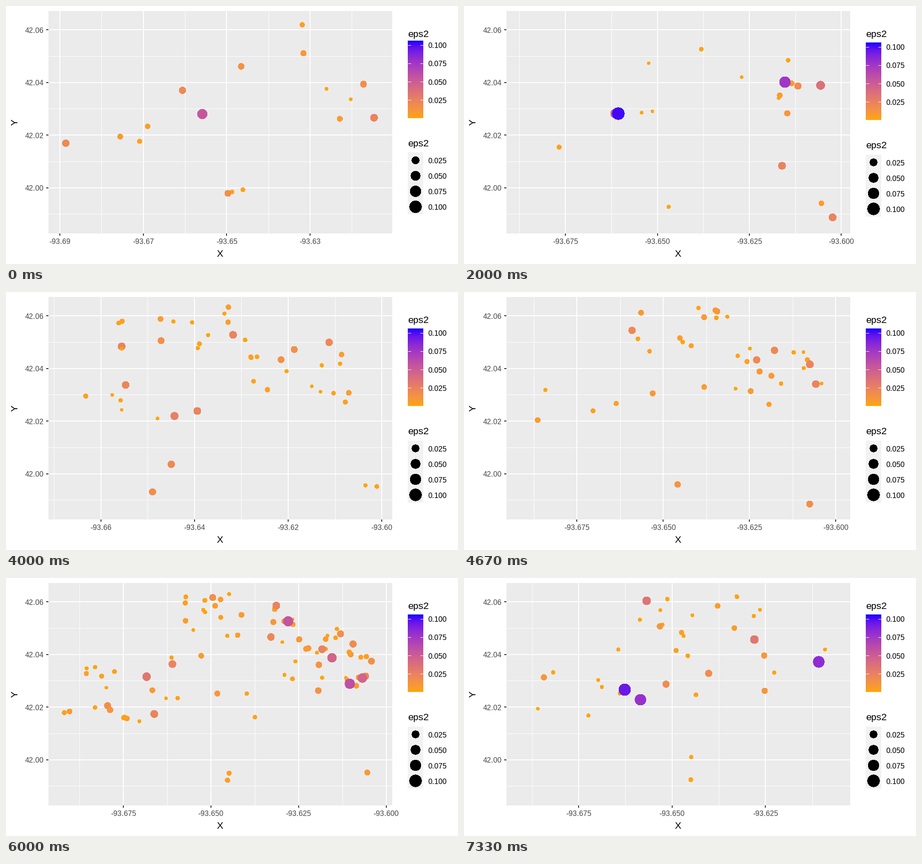
These frames come from a looping animation (990 by 566 pixels, 8 s). A matplotlib script:

```python
import numpy as np
import matplotlib.pyplot as plt
from matplotlib.animation import FuncAnimation
from matplotlib.patches import Rectangle

W, H, DPI = 990, 566, 64
PT = 72 / DPI
LOOP, STEP = 8000, 50
LEFT, RIGHT, TOP, BOTTOM = 92.5, 845.5, 10.5, 498.5
LAT_TOP, LAT_PX = 42.06, 115.4 / 0.02
R_MIN, R_SPAN = 3.1, 10.3
EPS_MIN, EPS_MAX = 0.0005, 0.1059
BREAKS = (0.025, 0.05, 0.075, 0.1)

# Neighbourhoods: longitude, latitude, half width, half height, share of dots
HOODS = np.array([
    (-93.643, 42.055, 0.017, 0.009, 0.29),
    (-93.617, 42.038, 0.013, 0.012, 0.34),
    (-93.680, 42.025, 0.014, 0.011, 0.21),
    (-93.651, 42.029, 0.014, 0.013, 0.10),
    (-93.647, 41.997, 0.003, 0.005, 0.02),
    (-93.604, 41.992, 0.004, 0.004, 0.04)])

plt.rcParams["font.family"] = "Liberation Sans"
plt.rcParams["text.hinting"] = "native"
plt.rcParams["text.hinting_factor"] = 1
fig = plt.figure(figsize=(W / DPI, H / DPI), dpi=DPI, facecolor="white")
ax = fig.add_axes([0, 0, 1, 1])
ax.set_xlim(0, W)
ax.set_ylim(H, 0)
ax.axis("off")

XYZ = np.array([[0.4124, 0.3576, 0.1805], [0.2126, 0.7152, 0.0722],
                [0.0193, 0.1192, 0.9505]])
WHITE = XYZ.sum(axis=1)


def to_lab(rgb):
    rgb = np.array(rgb, float)
    lin = np.where(rgb > 0.04045, ((rgb + 0.055) / 1.055) ** 2.4, rgb / 12.92)
    xyz = XYZ @ lin / WHITE
    f = np.where(xyz > 0.008856, np.cbrt(xyz), 7.787 * xyz + 16 / 116)
    return np.array([116 * f[1] - 16, 500 * (f[0] - f[1]), 200 * (f[1] - f[2])])


def from_lab(lab):
    fy = (lab[..., 0] + 16) / 116
    f = np.stack([fy + lab[..., 1] / 500, fy, fy - lab[..., 2] / 200], axis=-1)
    xyz = np.where(f > 0.2069, f ** 3, (f - 16 / 116) / 7.787)
    lin = np.clip((xyz * WHITE) @ np.linalg.inv(XYZ).T, 0, 1)
    rgb = np.where(lin > 0.0031308, 1.055 * lin ** (1 / 2.4) - 0.055, 12.92 * lin)
    return np.clip(rgb, 0, 1)


ORANGE, BLUE = to_lab((1, 165 / 255, 0)), to_lab((0, 0, 1))


def ramp(t):
    """Orange to blue, blended in Lab."""
    t = np.clip(np.asarray(t, float), 0, 1)[..., None]
    return from_lab(ORANGE + (BLUE - ORANGE) * t)


def text(x, y, s, px=17, color="black", **kw):
    return ax.text(x, y, s, fontsize=px * PT, color=color, **kw)


def vlines(xs, y0, y1, color, px, z=1):
    return ax.vlines(xs, y0, y1, colors=color, linewidths=px * PT, zorder=z)


def hlines(ys, x0, x1, color, px, z=1):
    return ax.hlines(ys, x0, x1, colors=color, linewidths=px * PT, zorder=z)


def circles(x, y, r, color):
    return ax.scatter(x, y, s=(2 * np.asarray(r) * PT) ** 2, c=color,
                      linewidths=0, antialiased=False, zorder=4)


def rect(x, y, w, h, color):
    return ax.add_patch(Rectangle((x, y), w, h, fc=color, lw=0, zorder=0))


def x_axis(first, step, start, unit, digits):
    k = np.arange(-1, 5)
    minor = first + (k + 0.5) * step
    minor = minor[(minor > LEFT) & (minor < RIGHT)]
    major = first + k * step
    shown = (major > LEFT) & (major < RIGHT + 0.5)
    k, major = k[shown], major[shown]
    out = [vlines(minor, TOP, BOTTOM, "white", 1),
           vlines(major, TOP, BOTTOM, "white", 2),
           vlines(major, BOTTOM, BOTTOM + 5, "#333333", 2)]
    for i, x in zip(k, major):
        out.append(text(x, 522.5, f"{start + i * unit:.{digits}f}",
                        color="#4d4d4d", ha="center"))
    return out


def legend(bar, keys):
    """Colour bar starting at y=bar and size keys starting at y=keys."""
    shades = ramp(np.linspace(1, 0, 170))[:, None, :]
    out = [ax.imshow(shades, extent=(880, 913.5, bar + 170, bar), aspect="auto",
                     interpolation="nearest", zorder=2),
           rect(880, keys, 34, 136, "#f2f2f2"),
           text(880, keys - 13, "eps2", 21.2)]
    t = (np.array(BREAKS) - EPS_MIN) / (EPS_MAX - EPS_MIN)
    ys = bar + 170 * (1 - t)
    out += [hlines(ys, 880, 887, "white", 1, 3),
            hlines(ys, 907, 913.5, "white", 1, 3)]
    rows = keys + 17.5 + 34 * np.arange(4)
    out.append(circles(np.full(4, 897), rows, R_MIN + R_SPAN * np.sqrt(t), "black"))
    for v, y, row in zip(BREAKS, ys, rows):
        out += [text(924, y + 6.5, f"{v:.3f}"), text(924, row + 6.5, f"{v:.3f}")]
    return out


def cloud(seed, n, axis):
    """n small dots spread over the neighbourhoods that the axis shows."""
    rng = np.random.default_rng(seed)
    first, step, start, unit, _ = axis
    hood = HOODS[rng.choice(len(HOODS), 5 * n, p=HOODS[:, 4])]
    lon, lat = (hood[:, :2] + hood[:, 2:4] * rng.uniform(-1, 1, (5 * n, 2))).T
    x = first + (lon - start) / unit * step
    y = 52.3 + (LAT_TOP - lat) * LAT_PX
    seen = (x > 126) & (x < 812.5) & (y > 32)
    r = np.minimum(3.3 + 2.2 * np.abs(rng.normal(size=n)), 8)
    return list(zip(x[seen][:n], y[seen][:n], r))


def scene(seed, axis, n, big=(), bar=80, keys=325.5):
    """One plot: n random dots plus big ones given as (x, y, radius)."""
    x, y, r = np.array(cloud(seed, n, axis) + list(big)).T
    color = ramp(((np.maximum(r, R_MIN) - R_MIN) / R_SPAN) ** 2)
    return x_axis(*axis) + [circles(x, y, r, color)] + legend(bar, keys)


def fine(first, step):
    return first, step, -93.675, 0.025, 3


def coarse(first, step, start):
    return first, step, start, 0.02, 2


# Fixed parts
rect(LEFT, TOP, RIGHT - LEFT, BOTTOM - TOP, "#ebebeb")
rows = 52.3 + 115.4 * np.arange(4)
hlines(rows + 57.7, LEFT, RIGHT, "white", 1)
hlines(rows, LEFT, RIGHT, "white", 2)
hlines(rows, LEFT - 5, LEFT, "#333333", 2)
for i, row in enumerate(rows):
    text(83, row + 6.7, f"{LAT_TOP - 0.02 * i:.2f}", color="#4d4d4d", ha="right")
text(469, 550.5, "X", 21.2, ha="center")
text(20.5, 255, "Y", 21.2, rotation=90, ha="center", va="center")
text(880, 68, "eps2", 21.2)

scenes = [
    scene(1, coarse(118, 182.7, -93.69), 12,
          [(430, 237, 10.5), (386.5, 185, 7.5), (131, 301, 7.5),
           (783, 171.5, 7), (486, 411, 7)], 76, 321),
    scene(2, fine(255.3, 196.5), 35,
          [(156, 187.5, 13), (230, 286, 12.2), (668, 182, 10.3),
           (691, 114.5, 8.7), (502.5, 53, 8.3)]),
    scene(3, fine(235, 195), 28),
    scene(4, fine(222.2, 201.4), 15,
          [(331, 236, 10), (338, 236, 13.2), (703, 167, 11.8),
           (781, 174, 9.2), (696.5, 350.5, 8)]),
    scene(5, fine(226, 199), 32),
    scene(6, fine(240, 193), 34),
    scene(7, coarse(207.5, 205.2, -93.66), 40,
          [(369, 272, 8.2), (419, 261, 8), (262, 204, 7.8),
           (362, 378, 7.5), (321, 438.5, 7.2)]),
    scene(8, fine(247, 189), 40),
    scene(9, fine(247.5, 189.2), 60,
          [(391.5, 113.5, 11.2), (285, 289, 11), (285, 290, 9.8),
           (608, 221, 9.6), (289, 204, 9.4), (511, 35, 8.8)]),
    scene(10, fine(256.8, 191.9), 80,
          [(753, 232, 10.8), (618, 95, 10.6), (714, 175, 9.8),
           (780.5, 219.5, 9.8), (308, 216.5, 8.8)]),
    scene(11, fine(262, 192), 44),
    scene(12, fine(251, 204.6), 33,
          [(352, 245, 12.8), (777, 184, 12.2), (386.5, 267, 12),
           (400, 50, 9), (636, 135, 8.8)]),
]


def update(i):
    # Switch on the step that contains each scene's start time
    now = ((i + 1) * STEP - 1) * len(scenes) // LOOP
    for k, artists in enumerate(scenes):
        for artist in artists:
            artist.set_visible(k == now)


anim = FuncAnimation(fig, update, frames=LOOP // STEP, interval=STEP, repeat=True)
plt.show()
```
